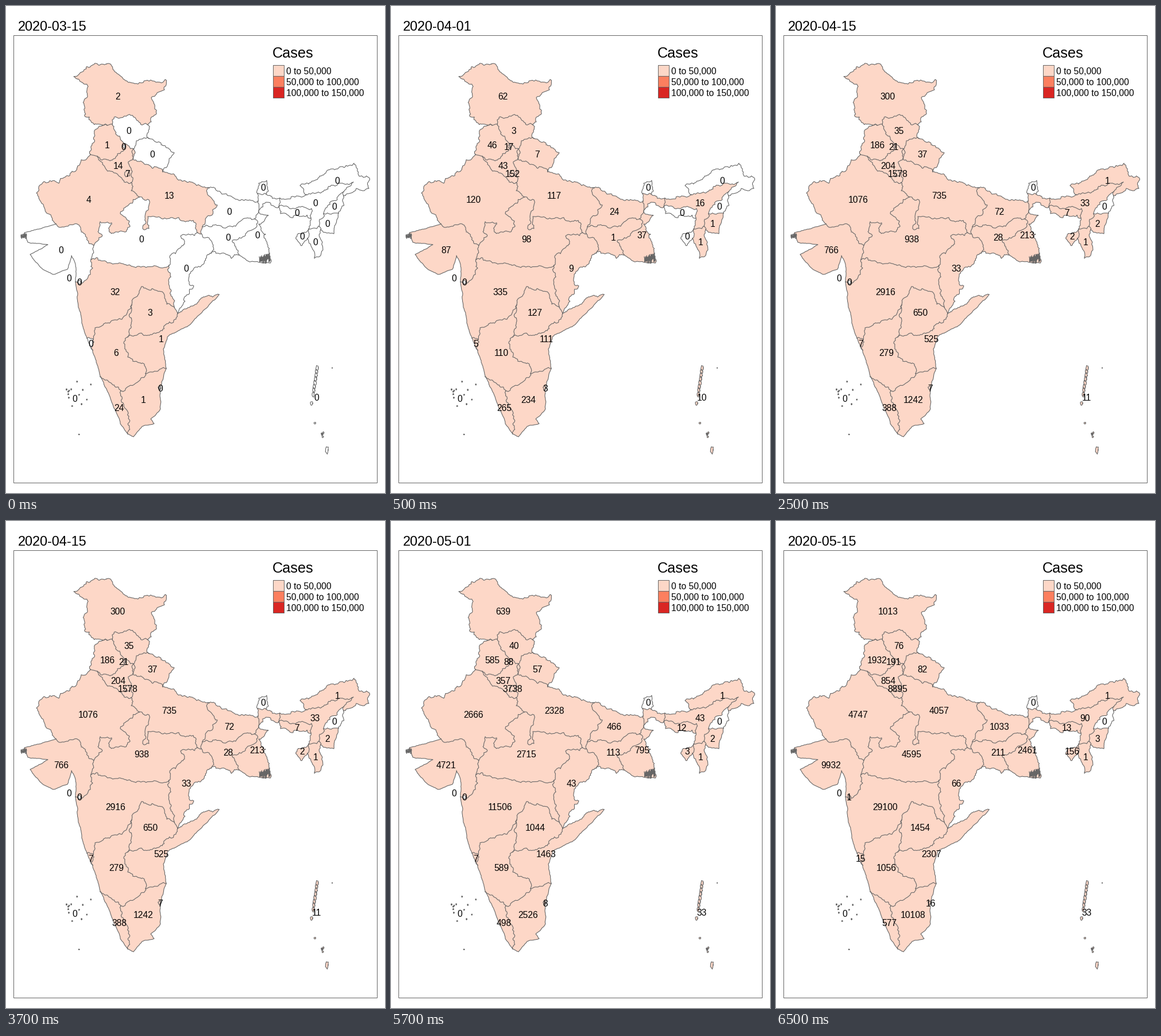
A matplotlib script for the animation above (8000 ms loop, 660 by 849 pixels).

```python
import numpy as np
import matplotlib.pyplot as plt
from matplotlib.animation import FuncAnimation
from matplotlib.patches import Polygon, Rectangle

W, H, DPI = 660, 849, 100
PX = 72 / DPI
GREY, REDS = "#666666", ("#FDD7C7", "#FC7F5F", "#D92623")
DATES = ("2020-03-15", "2020-04-01", "2020-04-15", "2020-05-01", "2020-05-15")

plt.rcParams["font.family"] = "Liberation Sans"
rng = np.random.default_rng(4)
fig = plt.figure(figsize=(W / DPI, H / DPI), dpi=DPI, facecolor="white")
ax = fig.add_axes([0, 0, 1, 1])
ax.set_xlim(0, W)
ax.set_ylim(H, 0)
ax.axis("off")

joints, borders, states = {}, {}, []


def outline(path):
    ax.plot(path.real, path.imag, color=GREY, lw=1.1 * PX, zorder=2)


def rough(points, amp):
    """Split segments at sideways-pushed midpoints until all are short."""
    path = [points[0]]
    for a, b in zip(points, points[1:]):
        length = abs(b - a)
        if length > 3.5:
            push = amp * np.clip(rng.normal(), -1.8, 1.8) * min(length, 14)
            middle = (a + b) / 2 + 1j * (b - a) / length * push
            path += rough([a, middle, b], amp)[1:]
        else:
            path.append(b)
    return path


def joint(regions, x, y):
    """Point where all the named regions meet."""
    joints[frozenset(regions.split())] = complex(x, y)


def border(pair, *bends):
    """Line between two regions, from one of their joints to the other."""
    sides = set(pair.split())
    start, end = [p for regions, p in joints.items() if sides <= regions]
    mid = [complex(x, y) for x, y in zip(bends[::2], bends[1::2])]
    if mid and abs(mid[0] - start) + abs(mid[-1] - end) > abs(mid[0] - end) + abs(mid[-1] - start):
        start, end = end, start
    borders[pair] = np.array(rough([start, *mid, end], 0.05 if "sea" in sides else 0.16))
    outline(borders[pair])


def ring(code):
    """Chain all borders of one state into a closed outline."""
    parts = [path for pair, path in borders.items() if code in pair.split()]
    path = parts.pop(0)
    while parts:
        gaps = [min(abs(p[0] - path[-1]), abs(p[-1] - path[-1])) for p in parts]
        part = parts.pop(int(np.argmin(gaps)))
        if abs(part[-1] - path[-1]) < abs(part[0] - path[-1]):
            part = part[::-1]
        path = np.append(path, part)
    return path


def blob(x, y, rx, ry, n=9):
    turn = np.linspace(0, 2 * np.pi, n + 1)[:-1]
    r = rng.uniform(0.7, 1.2, n)
    path = x + rx * r * np.cos(turn) + 1j * (y + ry * r * np.sin(turn))
    path = np.append(path, path[0])
    outline(path)
    return path


def creeks(x, bottom, w, h, n):
    rise = h * rng.random(n) * np.linspace(0.7, 1, n)
    outline(np.linspace(x, x + w, n) + 1j * (bottom - rise))


def state(x, y, cases, shapes):
    rings = [ring(shapes)] if isinstance(shapes, str) else shapes
    fills = [ax.add_patch(Polygon(np.column_stack([r.real, r.imag]), lw=0, zorder=1))
             for r in rings]
    label = ax.text(x, y + 5.5, "", ha="center", fontsize=15.6 * PX, zorder=4)
    states.append((cases, fills, label))


# Meeting points
joint("jk pb pak", 176, 208)
joint("jk pak chn", 175, 101)
joint("jk pb hp", 185, 206)
joint("jk hp chn", 247, 207)
joint("hp uk chn", 249, 231)
joint("hp hr uk up", 222, 249)
joint("hp hr pb", 206, 240)
joint("pb rj pak", 147, 259)
joint("pb rj hr", 159, 262)
joint("hr rj up", 218, 308)
joint("uk up chn npl", 273, 289)
joint("rj gj pak sea", 87, 380)
joint("rj gj mp", 153, 417)
joint("rj up mp", 232, 333)
joint("up mp cg", 333, 395)
joint("up cg jh", 340, 397)
joint("up br jh", 342, 385)
joint("up br npl", 354, 317)
joint("br wb npl", 439, 340)
joint("br wb jh", 433, 371)
joint("jh wb od sea", 406, 434)
joint("jh cg od", 357, 431)
joint("wb sea ban", 460, 448)
joint("wb sk npl out", 438, 327)
joint("wb sk bhu out", 453, 328)
joint("wb as bhu", 477, 335)
joint("wb as ml ban", 475, 350)
joint("as ml ban syl", 531, 370)
joint("as ar bhu chn", 523, 329)
joint("as ar nl", 588, 324)
joint("ar nl mya chn", 588, 331)
joint("as nl mn", 553, 362)
joint("nl mn mya", 579, 361)
joint("as mn mz", 545, 384)
joint("mn mz mya out", 548, 390)
joint("as mz tr syl", 527, 389)
joint("mz tr syl out", 525, 405)
joint("cg mp mh", 284, 452)
joint("cg mh tg", 293, 525)
joint("cg tg ap od", 299, 536)
joint("ap od sea", 371, 503)
joint("mp gj mh", 148, 442)
joint("gj mh sea", 121, 481)
joint("mh ga sea", 141, 579)
joint("mh ga ka", 152, 581)
joint("ga ka sea", 151, 600)
joint("mh ka tg", 219, 521)
joint("tg ka ap", 212, 577)
joint("ap tn sea", 279, 632)
joint("ap ka tn", 243, 641)
joint("ka tn kl", 200, 671)
joint("ka kl sea", 164, 646)
joint("kl tn sea", 212, 746)

# Borders with their main bends
border("jk pak", 148, 201, 137, 192, 136, 165, 143, 140, 118, 123, 136, 111, 160, 102)
border("jk chn", 188, 112, 203, 125, 230, 136, 252, 129, 277, 128, 276, 146, 253, 160, 262, 188,
       253, 202)
border("jk hp", 190, 193, 215, 189, 232, 203)
border("hp chn", 246, 222)
border("hp uk", 227, 235)
border("pb hp", 188, 215)
border("pb pak", 160, 213, 150, 240)
border("pb hr", 165, 268, 192, 262, 205, 252)
border("uk chn", 270, 242, 293, 256, 281, 279)
border("uk up", 222, 268, 250, 278)
border("hr up", 213, 274)
border("rj hr", 168, 276, 182, 288, 203, 303)
border("rj pak", 131, 268, 115, 288, 92, 309, 66, 306, 53, 326, 62, 344, 78, 364)
border("rj gj", 124, 380, 131, 394)
border("rj mp", 167, 402, 164, 376, 184, 378, 180, 394, 210, 391, 215, 375, 199, 362, 214, 346)
border("rj up", 218, 322)
border("up npl", 303, 303, 332, 313)
border("up br", 352, 330, 368, 347, 355, 366)
border("up mp", 249, 338, 242, 368, 238, 388, 249, 388, 247, 367, 290, 369, 330, 378)
border("br npl", 376, 328, 400, 337)
border("br wb", 440, 360)
border("br jh", 360, 382, 400, 384, 413, 371)
border("jh wb", 437, 384, 395, 408)
border("jh od", 393, 440, 382, 432)
border("jh cg", 355, 407, 361, 417)
border("wb sea", 424, 446, 442, 447)
border("wb ban", 456, 420, 452, 398, 440, 380, 457, 365, 442, 362, 447, 345)
border("sk out", 440, 309, 454, 304)
border("as bhu", 500, 332)
border("as ar", 553, 323, 583, 309, 605, 307)
border("as nl", 578, 332)
border("as mn", 546, 372)
border("as ml", 510, 350, 532, 353)
border("ml ban", 478, 362, 500, 369)
border("ar chn", 512, 313, 540, 303, 570, 284, 606, 274, 612, 288, 633, 300, 632, 318, 610, 318)
border("nl mya", 587, 342)
border("mn mya", 571, 397)
border("mz out", 537, 440, 546, 437, 551, 412)
border("tr syl", 505, 403, 514, 418)
border("cg mp", 322, 399, 304, 401, 311, 415, 287, 434)
border("cg mh", 283, 478, 287, 505)
border("cg od", 338, 455, 322, 463, 319, 484, 327, 488, 318, 503)
border("mp mh", 238, 454, 226, 456, 195, 449)
border("gj mh", 151, 457, 147, 468, 133, 483)
border("gj sea", 52, 390, 32, 395, 38, 412, 73, 416, 42, 433, 63, 458, 82, 468, 107, 459,
       114, 435, 120, 447, 122, 465)
border("mh sea", 124, 510, 132, 550)
border("mh ka", 155, 561, 180, 553, 207, 540)
border("mh tg", 236, 489, 272, 498, 280, 520)
border("tg ka", 219, 548)
border("tg ap", 250, 574, 275, 558, 296, 546)
border("ap od", 325, 523, 340, 509)
border("ap sea", 342, 533, 320, 556, 281, 577, 274, 598)
border("ap ka", 207, 595, 212, 612, 232, 622, 243, 630)
border("ka tn", 223, 660)
border("ka kl", 176, 652)
border("ka sea", 157, 618)
border("kl sea", 181, 681, 199, 728)
border("kl tn", 204, 692, 214, 715)
border("tn sea", 222, 751, 237, 733, 258, 728, 252, 720, 269, 702, 268, 670)
for pair in ("jk pb,hp hr,pb rj,up jh,up cg,wb npl,wb sk,wb bhu,wb as,as mz,as syl,ar nl,nl mn,"
             "mn mz,mz tr,mp gj,cg tg,mh ga,ga ka,ga sea,ap tn").split(","):
    border(pair)

# Islands and river mouths
creeks(441, 449, 19, 19, 75)
creeks(26, 406, 10, 11, 30)
andaman = [blob(542 - 7 * t, 631 + 46 * t, 2.2, 4.5) for t in np.linspace(0, 1, 8)]
andaman += [blob(532, 693, 2.3, 4), blob(538, 727, 1.5, 1.7), blob(568, 631, 0.4, 0.4),
            blob(559, 774, 2.5, 7)]
andaman += [blob(x, y, 1.2, 1.7) for x, y in rng.normal((551, 748), (1.5, 4), (5, 2))]
atolls = [blob(x, y, 0.8, 1.2) for x, y in rng.uniform((100, 654), (150, 711), (13, 2))]
atolls.append(blob(127, 747, 0.8, 0.8))

# Label position, counts by date, shape
state(195, 157, (2, 62, 300, 639, 1013), "jk")
state(214, 217, (0, 3, 35, 40, 76), "hp")
state(176.5, 242, (1, 46, 186, 585, 1932), "pb")
state(255, 258, (0, 7, 37, 57, 82), "uk")
state(195, 279, (14, 43, 204, 357, 854), "hr")
state(143.5, 337, (4, 120, 1076, 2666, 4747), "rj")
state(284, 330, (13, 117, 735, 2328, 4057), "up")
state(205, 245, (0, 17, 21, 88, 191), [blob(205.5, 245, 2.2, 3)])
state(212, 292, (7, 152, 1578, 3738, 8895), [blob(211.5, 292, 5, 6)])
state(389, 358, (0, 24, 72, 466, 1033), "br")
state(448, 316, (0, 0, 0, 0, 0), "sk")
state(577, 305, (0, 0, 1, 1, 1), "ar")
state(538.5, 343, (0, 16, 33, 43, 90), "as")
state(572, 349, (0, 0, 0, 0, 0), "nl")
state(506.5, 360, (0, 0, 7, 12, 13), "ml")
state(560, 379, (0, 1, 2, 2, 3), "mn")
state(516, 401, (0, 0, 2, 3, 156), "tr")
state(539, 411, (0, 1, 1, 1, 1), "mz")
state(437.5, 399, (0, 37, 213, 795, 2461), "wb")
state(387, 403, (0, 1, 28, 113, 211), "jh")
state(236, 406, (0, 98, 938, 2715, 4595), "mp")
state(96, 425, (0, 87, 766, 4721, 9932), "gj")
state(109.5, 474, (0, 0, 0, 0, 0), [])
state(127.5, 481, (0, 0, 0, 0, 1), [blob(127.5, 481, 3, 4)])
state(314, 457, (0, 9, 33, 43, 66), "cg")
state(190.5, 498, (32, 335, 2916, 11506, 29100), "mh")
state(251, 534, (3, 127, 650, 1044, 1454), "tg")
state(270.5, 581, (1, 111, 525, 1463, 2307), "ap")
state(192, 604, (6, 110, 279, 589, 1056), "ka")
state(147.5, 589, (0, 5, 7, 7, 15), "ga")
state(197, 700, (24, 265, 388, 498, 577), "kl")
state(239, 687, (1, 234, 1242, 2526, 10108), "tn")
state(269, 666, (0, 3, 7, 8, 16), [blob(267.5, 666, 2.5, 4)])
state(120, 685, (0, 0, 0, 0, 0), atolls)
state(541, 683, (0, 10, 11, 33, 33), andaman)

# Frame, legend and date
ax.add_patch(Rectangle((12.5, 50.5), 633, 780, fill=False, ec=GREY, lw=PX))
ax.text(464, 89.5, "Cases", fontsize=25.3 * PX)
for i, color in enumerate(REDS):
    ax.add_patch(Rectangle((464.5, 102.5 + 19 * i), 19, 19, fc=color, ec=GREY, lw=PX))
    low, high = 50000 * i, 50000 * (i + 1)
    ax.text(488.5, 118.5 + 19 * i, f"{low:,} to {high:,}", fontsize=15.6 * PX)
date = ax.text(20.5, 43, "", fontsize=23.5 * PX)


def draw(frame):
    step = (frame + 3) // 4
    date.set_text(DATES[step])
    for cases, fills, label in states:
        count = cases[step]
        label.set_text(str(count))
        for fill in fills:
            fill.set_facecolor(REDS[count // 50000] if count else "white")
    return []


anim = FuncAnimation(fig, draw, frames=16, interval=500, repeat=True, repeat_delay=0)
plt.show()
```
